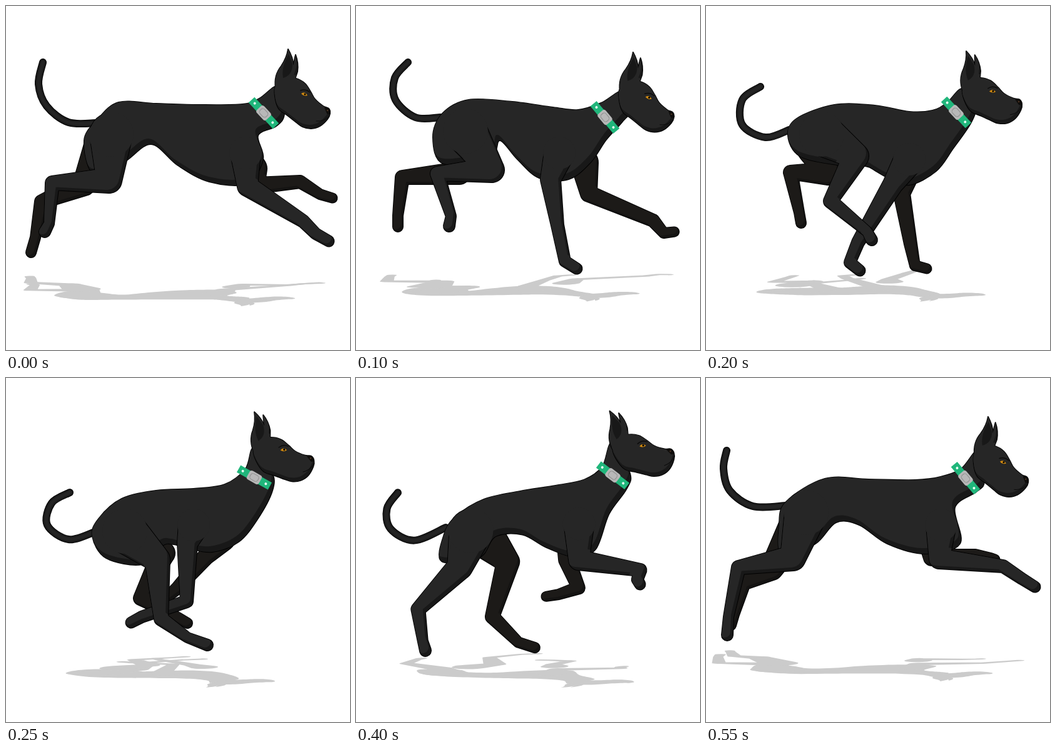
An HTML page with a canvas that plays this animation: 550 px wide and 550 px high, repeating every 600 ms.

```html
<!DOCTYPE html>
<html lang="en">
<head>
<meta charset="utf-8">
<title>Running dog</title>
<style>
  html, body { margin: 0; width: 100%; height: 100%; overflow: hidden; background: #fff; }
  canvas { display: block; width: 550px; height: 550px; }
</style>
</head>
<body>
<canvas id="stage" width="550" height="550"></canvas>
<script>
const ctx = document.getElementById('stage').getContext('2d');
const STEP = 50, STEPS = 12;

// Key poses of the gallop. Limbs: root, middle joint, lower joint, ankle, toe.
const poses = [
  {
    step: 0, ground: [436], head: [452, 69, 0], collar: [412, 171, 47],
    body: [436,128, 405,148, 378,157, 310,158, 240,156, 180,154, 146,182, 125,215, 140,268,
      188,250, 232,221, 275,255, 325,281, 385,284, 411,245, 403,207, 432,192, 445,172],
    tail: [145,187, 100,186, 65,160, 52,125, 59,90],
    nearHind: [168,205, 165,279, 74,283, 69,348, 62,361],
    farHind: [155,225, 125,285, 57,313, 47,370, 40,394],
    nearFront: [383,235, 386,288, 475,344, 495,364, 516,376],
    farFront: [395,260, 400,287, 470,281, 502,301, 522,307]
  },
  {
    step: 2, ground: [429], head: [444, 74, 1], collar: [398, 178, 50],
    body: [428,135, 392,155, 355,166, 315,162, 250,153, 180,150, 138,172, 123,210, 140,252,
      215,240, 230,215, 258,245, 293,275, 340,277, 375,250, 400,214, 425,186, 440,165],
    tail: [135,178, 95,178, 63,150, 62,115, 83,90],
    nearHind: [175,200, 217,262, 130,268, 152,336, 149,352],
    farHind: [160,210, 165,267, 74,274, 67,335, 67,353],
    nearFront: [325,235, 311,277, 322,350, 334,408, 353,420],
    farFront: [365,250, 372,300, 475,343, 492,363, 509,361]
  },
  {
    step: 4, ground: [429], head: [417, 72, -13.4], collar: [400, 170, 47],
    body: [410,132, 385,155, 362,167, 325,169, 270,159, 205,158, 145,180, 131,207, 150,240,
      210,254, 255,256, 272,264, 290,274, 325,286, 368,264, 395,228, 424,186, 430,160],
    tail: [133,198, 95,210, 58,190, 58,150, 87,129],
    nearHind: [185,205, 240,240, 199,312, 258,361, 265,374],
    farHind: [175,225, 195,268, 135,266, 149,330, 152,347],
    nearFront: [325,245, 299,285, 243,378, 230,410, 246,423],
    farFront: [320,265, 313,300, 327,380, 334,415, 353,420]
  },
  {
    step: 5, ground: [449], head: [398, 54, -17.8], collar: [397, 159, 29],
    body: [396,112, 383,145, 350,170, 300,177, 240,180, 185,193, 148,225, 138,253, 160,288,
      218,298, 250,268, 268,266, 290,272, 330,278, 372,262, 402,226, 426,180, 425,150],
    tail: [142,246, 100,258, 66,235, 73,200, 102,183],
    nearHind: [190,245, 242,290, 248,385, 290,415, 322,427],
    farHind: [210,245, 252,280, 215,352, 275,383, 290,392],
    nearFront: [300,235, 290,264, 289,357, 217,382, 200,391],
    farFront: [345,255, 320,285, 275,335, 258,350, 245,368]
  },
  {
    step: 7, ground: [447], head: [388, 55, -29], collar: [402, 157, 29],
    body: [395,100, 385,142, 355,165, 300,176, 240,184, 190,202, 150,236, 142,262, 165,300,
      215,300, 232,254, 265,252, 295,269, 330,282, 362,276, 395,230, 424,180, 425,150],
    tail: [145,245, 100,263, 62,240, 65,205, 92,181],
    nearHind: [185,250, 218,299, 155,373, 192,426, 209,439],
    farHind: [215,260, 253,290, 250,384, 295,410, 325,420],
    nearFront: [335,235, 322,287, 403,326, 370,338, 358,347],
    farFront: [320,260, 303,285, 308,347, 275,358, 256,366]
  },
  {
    step: 9, ground: [450], head: [429, 51, -15], collar: [418, 155, 46],
    body: [425,110, 403,142, 375,160, 340,167, 280,176, 215,182, 165,204, 137,236, 110,285,
      180,272, 215,252, 265,249, 310,272, 365,288, 405,270, 413,205, 440,176, 450,155],
    tail: [140,230, 85,250, 48,235, 34,205, 42,178],
    nearHind: [180,235, 120,302, 55,361, 34,410, 28,429],
    farHind: [200,255, 219,297, 168,370, 202,426, 220,434],
    nearFront: [374,232, 385,292, 490,293, 510,313, 530,320],
    farFront: [370,270, 372,295, 403,318, 380,328, 363,328]
  },
  {
    step: 11, ground: [440], head: [452, 62, 1.6], collar: [415, 160, 50],
    body: [436,115, 408,145, 375,158, 335,163, 260,162, 190,161, 128,198, 117,235, 122,285,
      175,265, 208,231, 245,235, 290,265, 350,281, 406,265, 398,207, 432,182, 445,165],
    tail: [128,204, 75,205, 38,180, 28,145, 33,116],
    nearHind: [160,215, 139,288, 52,303, 36,382, 34,411],
    farHind: [150,230, 105,305, 60,328, 45,378, 40,395],
    nearFront: [376,235, 373,289, 475,301, 505,321, 526,334],
    farFront: [365,270, 361,287, 430,284, 455,288, 462,290]
  }
];

const radii = {
  nearHind: [34, 20, 11, 8, 9],
  farHind: [30, 18, 11, 8, 8],
  nearFront: [24, 16, 10, 9, 8.5],
  farFront: [22, 13, 10, 8, 7.5]
};
const coat = { light: '#262626', dark: '#181818' };
const farCoat = { light: '#1c1a18', dark: '#141312' };

const skull = [-21,58, -22,75, -16,95, -2,106, 12,117, 22,124, 36,127, 50,123, 62,112,
  66,103, 64,95, 55,91, 42,80, 35,68, 26,55, 12,47, -8,44];
const ears = 'M2,52Q12,40 7,24Q7,14 -1,0Q-3,14 -12,27Q-24,42 -21,62Z' +
  'M10,48L14,36Q16,22 11,9Q8,20 4,50Z';

const wrap = i => (i + poses.length) % poses.length;
const keyStep = i => poses[wrap(i)].step + STEPS * Math.floor(i / poses.length);

// Periodic cubic blend between the key poses.
function poseAt(step) {
  let i = poses.length - 1;
  while (poses[i].step > step) i--;
  const [sa, s0, s1, sb] = [-1, 0, 1, 2].map(d => keyStep(i + d));
  const [pa, p0, p1, pb] = [-1, 0, 1, 2].map(d => poses[wrap(i + d)]);
  const span = s1 - s0, u = (step - s0) / span;
  const blend = (a, b, c, d) => {
    const m0 = (c - a) / (s1 - sa) * span, m1 = (d - b) / (sb - s0) * span;
    return b + u * (m0 + u * (3 * (c - b) - 2 * m0 - m1 + u * (2 * (b - c) + m0 + m1)));
  };
  const pose = {};
  for (const part in p0) {
    if (part === 'step') continue;
    pose[part] = p0[part].map((v, k) => blend(pa[part][k], v, p1[part][k], pb[part][k]));
  }
  return pose;
}

function spline(flat, closed) {
  const path = new Path2D(), n = flat.length / 2;
  const at = i => {
    const k = closed ? (i + n) % n : Math.max(0, Math.min(n - 1, i));
    return [flat[2 * k], flat[2 * k + 1]];
  };
  path.moveTo(...at(0));
  for (let i = 0; i < (closed ? n : n - 1); i++) {
    const [a, b, c, d] = [at(i - 1), at(i), at(i + 1), at(i + 2)];
    path.bezierCurveTo(b[0] + (c[0] - a[0]) / 6, b[1] + (c[1] - a[1]) / 6,
      c[0] - (d[0] - b[0]) / 6, c[1] - (d[1] - b[1]) / 6, c[0], c[1]);
  }
  if (closed) path.closePath();
  return path;
}

// Chain of tapered capsules through the joints.
function limb(joints, r) {
  const path = new Path2D();
  for (let i = 0; i < r.length - 1; i++) {
    const [x0, y0, x1, y1] = joints.slice(2 * i, 2 * i + 4);
    const dir = Math.atan2(y1 - y0, x1 - x0);
    const ratio = (r[i] - r[i + 1]) / Math.hypot(x1 - x0, y1 - y0);
    const side = Math.acos(Math.max(-1, Math.min(1, ratio)));
    path.moveTo(x0 + r[i] * Math.cos(dir + side), y0 + r[i] * Math.sin(dir + side));
    path.arc(x0, y0, r[i], dir + side, dir - side + 2 * Math.PI);
    path.arc(x1, y1, r[i + 1], dir - side, dir + side);
    path.closePath();
  }
  return path;
}

function headPath([x, y, angle]) {
  const local = spline(skull, true);
  local.addPath(new Path2D(ears));
  const path = new Path2D();
  path.addPath(local, new DOMMatrix().translate(x, y).rotate(angle));
  return path;
}

function shaded(path, colors, dx, dy) {
  ctx.save();
  ctx.strokeStyle = '#000';
  ctx.lineWidth = 2;
  ctx.lineJoin = 'round';
  ctx.stroke(path);
  ctx.fillStyle = colors.dark;
  ctx.fill(path);
  ctx.clip(path);
  ctx.translate(dx, dy);
  ctx.fillStyle = colors.light;
  ctx.fill(path);
  ctx.restore();
}

function disc(x, y, r, color) {
  ctx.fillStyle = color;
  ctx.beginPath();
  ctx.arc(x, y, r, 0, 2 * Math.PI);
  ctx.fill();
}

// Hides the upper outline of a near leg where it merges with the body.
function mergeRoot(body, [x, y], r) {
  ctx.save();
  ctx.clip(body);
  disc(x, y, r, coat.light);
  ctx.restore();
}

function drawTail(points) {
  const path = spline(points, false);
  ctx.lineCap = 'round';
  for (const [width, color] of [[12, '#000'], [10, '#1b1b1b'], [5, '#242424']]) {
    ctx.lineWidth = width;
    ctx.strokeStyle = color;
    ctx.stroke(path);
  }
}

function drawFace([x, y, angle]) {
  ctx.save();
  ctx.translate(x, y);
  ctx.rotate(angle * Math.PI / 180);
  ctx.fillStyle = '#181818';
  ctx.fill(new Path2D('M0,8Q-12,28 -9,46Q6,42 6,24Z'));
  ctx.strokeStyle = '#0c0c0c';
  ctx.lineWidth = 1.5;
  ctx.stroke(new Path2D('M19,66Q27,63 34,69'));
  ctx.lineWidth = 1;
  ctx.stroke(new Path2D('M64,108Q56,116 44,115'));
  ctx.fillStyle = '#d08a12';
  ctx.fill(new Path2D('M20,71Q26,67 30,74Q24,76 20,71Z'));
  disc(26, 72, 1.6, '#000');
  ctx.fillStyle = '#0e0c0a';
  ctx.fill(new Path2D('M57,93Q66,92 67,101Q66,106 61,103Z'));
  disc(62, 98, 1.3, '#4a3222');
  ctx.restore();
}

function drawCollar([x, y, angle]) {
  ctx.save();
  ctx.translate(x, y);
  ctx.rotate(angle * Math.PI / 180);
  ctx.fillStyle = '#20b67b';
  ctx.fillRect(-28.5, -6.5, 57, 13);
  disc(-21, 0, 2, '#eafff6');
  disc(21, 0, 2, '#eafff6');
  ctx.fillStyle = '#b8b8b8';
  ctx.strokeStyle = '#8e8e8e';
  ctx.lineWidth = 1;
  ctx.beginPath();
  ctx.roundRect(-11, -8, 22, 16, 4);
  ctx.fill();
  ctx.beginPath();
  ctx.roundRect(-7, -5, 14, 10, 4);
  ctx.stroke();
  ctx.restore();
}

function drawShadow(ground, near, far) {
  ctx.save();
  ctx.fillStyle = '#cbcbcb';
  ctx.transform(1, 0, 0.187, -0.122, -88, ground + 52.5);
  near.forEach(path => ctx.fill(path));
  ctx.restore();
  ctx.save();
  ctx.fillStyle = '#cbcbcb';
  ctx.transform(1, 0, 0.187, -0.122, -76, ground + 44.5);
  far.forEach(path => ctx.fill(path));
  ctx.restore();
}

function draw(step) {
  const pose = poseAt(step);
  const leg = {};
  for (const name in radii) leg[name] = limb(pose[name], radii[name]);
  const body = spline(pose.body, true), head = headPath(pose.head);

  ctx.fillStyle = '#fff';
  ctx.fillRect(0, 0, 550, 550);
  drawShadow(pose.ground[0], [body, head, leg.nearHind, leg.nearFront], [leg.farHind, leg.farFront]);

  drawTail(pose.tail);
  shaded(leg.farFront, farCoat, -3, -4);
  shaded(leg.farHind, farCoat, -3, -4);
  shaded(body, coat, -4, -9);
  for (const name of ['nearFront', 'nearHind']) {
    shaded(leg[name], coat, -4, -5);
    mergeRoot(body, pose[name], radii[name][0] + 2);
  }
  shaded(head, coat, -2, -6);
  drawFace(pose.head);
  drawCollar(pose.collar);
}

const start = performance.now();
let shown = -1;
function tick() {
  const step = Math.floor((performance.now() - start) / STEP) % STEPS;
  if (step !== shown) draw(shown = step);
  requestAnimationFrame(tick);
}
tick();
</script>
</body>
</html>
```
